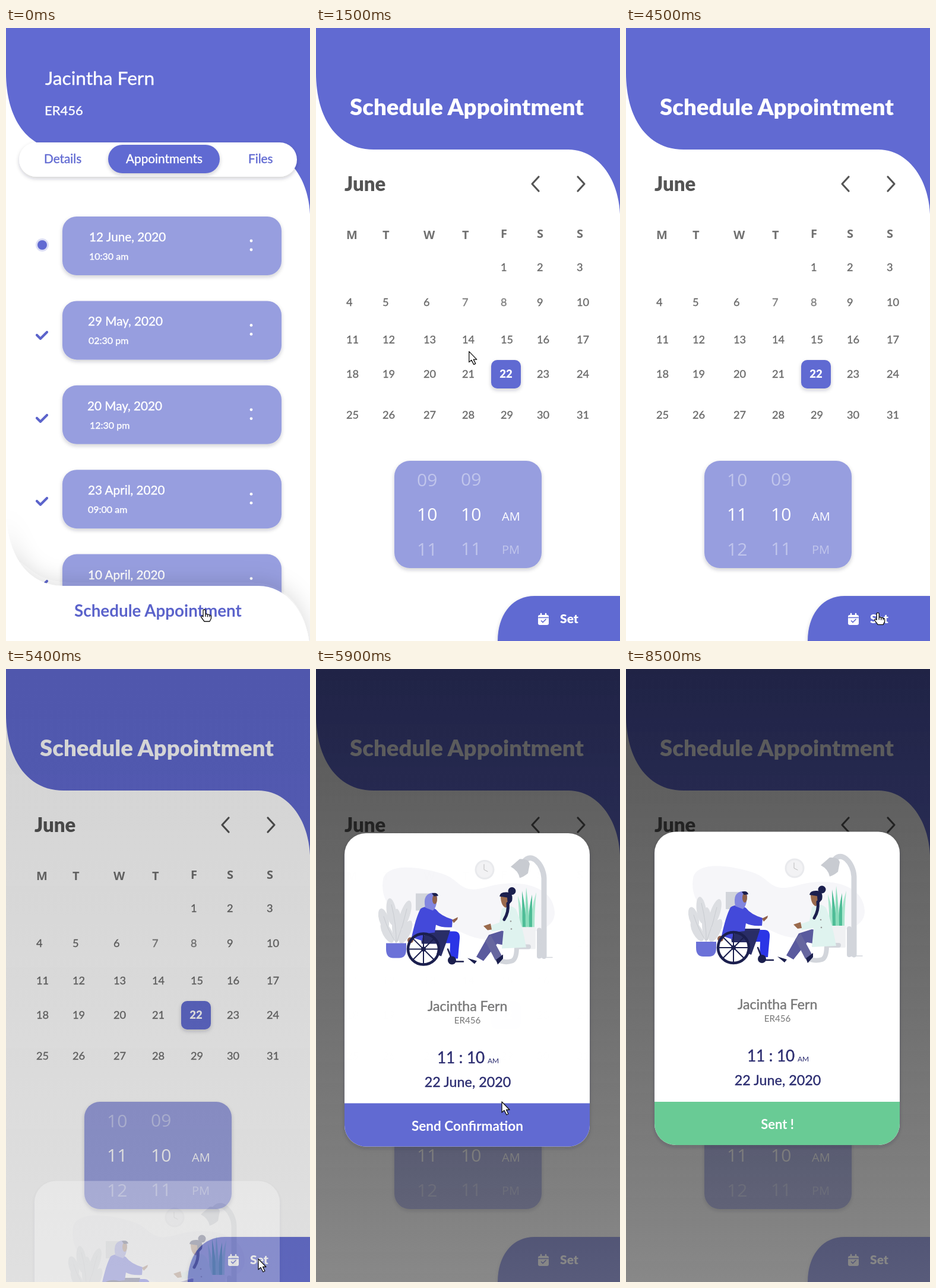
Write an HTML page that moves like this. It is 512 by 1034 pixels and loops after 8.6 s.

```html
<!DOCTYPE html>
<html lang="en">
<head>
<meta charset="utf-8">
<title>Appointment scheduling</title>
<style>
html,body{margin:0;height:100%;overflow:hidden;background:#fff}
svg{display:block;width:100vw;height:100vh}
text{font-family:Lato,Inter,sans-serif;white-space:pre}
.sys{font-family:"Open Sans","Noto Sans",sans-serif}
</style>
</head>
<body>
<svg id="stage" viewBox="0 0 512 1034"></svg>
<script>
const BLUE = '#616ad2', CARD = '#979edf', NAVY = '#1b1f4e', GREY = '#d2d5db';
const PERSON = 'Jacintha Fern', ID = 'ER456';
const LOOP = 8600;

const text = (x, y, s, size, fill, more = '') =>
  `<text x="${x}" y="${y}" font-size="${size}" fill="${fill}" ${more}>${s}</text>`;
const rect = (x, y, w, h, r, fill, more = '') =>
  `<rect x="${x}" y="${y}" width="${w}" height="${h}" rx="${r}" fill="${fill}" ${more}/>`;
const path = (d, fill, more = '') => `<path d="${d}" fill="${fill}" ${more}/>`;
const line = (d, stroke, w, more = '') =>
  path(d, 'none', `stroke="${stroke}" stroke-width="${w}" stroke-linecap="round" stroke-linejoin="round" ${more}`);
const disc = (x, y, r, fill, more = '') => `<circle cx="${x}" cy="${y}" r="${r}" fill="${fill}" ${more}/>`;
const oval = (x, y, rx, ry, fill, turn = 0) =>
  `<ellipse cx="${x}" cy="${y}" rx="${rx}" ry="${ry}" fill="${fill}" transform="rotate(${turn} ${x} ${y})"/>`;
const MID = 'text-anchor="middle"', SOFT = 'filter="url(#soft)"';
const medium = c => `stroke="${c}" stroke-width=".4"`;

// Appointment list
const visits = [
  ['12 June, 2020', '10:30 am', 140, 140],
  ['29 May, 2020', '02:30 pm', 138, 139],
  ['20 May, 2020', '12:30 pm', 137, 141],
  ['23 April, 2020', '09:00 am', 138, 138],
  ['10 April, 2020', '04:00 pm', 138, 138]
];
const visit = ([day, hour, dx, hx], i) => {
  const y = 318 + i * 142.4;
  return rect(95, y, 369, 99, 24, CARD, SOFT) +
    text(dx, y + 42, day, 20.7, '#fff', medium('#fff')) +
    text(hx, y + 73, hour, 16, '#fff', medium('#fff')) +
    disc(413, y + 41, 2.4, '#fff') + disc(413, y + 56, 2.4, '#fff') +
    (i ? line(`M52 ${378 + i * 140}l6 6 11-11`, '#5b63cb', 4.2)
       : disc(61, 366, 11, BLUE, 'opacity=".22"') + disc(61, 366, 8, BLUE));
};

// Calendar
const cols = [51, 112, 181, 246, 311, 372, 439], rows = [410, 469, 532, 590, 659];
const calendar = () => {
  let s = text(48, 275, 'June', 33, '#555', 'font-weight="900"') +
    line('M375 251l-11 12 11 12M441 251l11 12-11 12', '#555', 3.2);
  [...'MTWTFSS'].forEach((d, i) =>
    s += text(cols[i], i < 4 ? 356 : 354, d, 20, '#707070', 'class="sys" font-weight="700"'));
  s += rect(295, 560, 50, 48, 10, BLUE, SOFT);
  for (let d = 1; d < 32; d++) {
    const c = (d + 3) % 7, y = rows[(d + 3) / 7 | 0];
    s += d === 22 ? text(320, 590, d, 18.5, '#fff', MID + ' font-weight="900"')
      : text(cols[c], y, d, 18.2, d === 7 || d === 8 ? '#888' : '#666', medium('#777'));
  }
  return s;
};
const sys = (x, y, s, size, more = '') => text(x, y, s, size, '#fff', 'class="sys" ' + more);
const picker = () => rect(132, 730, 248, 181, 26, CARD, SOFT) +
  '<g clip-path="url(#wheel)">' +
  ['09', '10', '11', '12'].map(h => sys(170, 0, h, 30, 'data-hour')).join('') + '</g>' +
  sys(244, 772, '09', 30, 'opacity=".4"') + sys(244, 831, '10', 30) + sys(244, 889, '11', 30, 'opacity=".4"') +
  sys(313, 831, 'AM', 20) + sys(313, 887, 'PM', 20, 'opacity=".4"');
const setButton = path('M306 1034C306 990 330 958 368 958H512V1034Z', BLUE, SOFT) +
  rect(374, 990, 18, 17, 3, '#fff') + line('M379 988v4M387 988v4', '#fff', 2.5) +
  line('M375 994.5h16M379.5 1000l2.5 2.5 5-5', BLUE, 1.7) +
  text(411, 1004, 'Set', 21, '#fff', 'font-weight="900"');

// Consultation picture
const scene = () => {
  const leaf = (x, y, len, turn) => oval(x, y, 8, len, '#dcdee2', turn);
  const blade = (x, tip, top, c) =>
    path(`M${x - 3} 433Q${x - 4} 405 ${tip} ${top}Q${x + 3} 405 ${x + 3} 433Z`, c);
  const spokes = [0, 1, 2, 3].map(i => {
    const a = i * Math.PI / 4, x = 25 * Math.cos(a), y = 25 * Math.sin(a);
    return `M${181 - x} ${470 - y}L${181 + x} ${470 + y}`;
  }).join('');
  return path('M113 352C120 325 170 330 210 342C245 352 240 378 285 366C335 350 400 360 402 408C402 445 350 440 310 452C270 460 245 440 215 428C150 435 105 400 113 352Z', '#f6f6f9') +
    rect(168, 376, 29, 29, 0, GREY) +
    disc(284, 336, 16.5, '#e9eaed') + disc(284, 336, 13.5, '#f2f2f4') + line('M283 327v9l6 3', '#bbb', 1) +
    line('M384 482V350C383 326 362 306 351 322', GREY, 9) + line('M376 484h22', GREY, 1.5) +
    path('M328 331L343 318Q358 317 360 326L357 342Q350 348 343 350Q341 338 328 331Z', '#c8cbd1') +
    // left plant
    leaf(114, 419, 18, -16) + leaf(127, 407, 23, -8) + leaf(150, 412, 25, 18) +
    leaf(120, 442, 19, -28) + leaf(151, 441, 21, 25) + leaf(136, 430, 28, 0) +
    line('M135 460Q136 430 127 395M136 458Q147 430 153 402M134 458Q121 438 114 415', '#c9ccd1', 1) +
    path('M118 460H152V470Q152 485 140 485H130Q118 485 118 470Z', '#6b71d8') +
    // desk plant
    blade(346, 340, 380, '#a9e6cd') + blade(365, 371, 374, '#a9e6cd') + blade(351, 347, 372, '#4ebd97') +
    blade(361, 364, 378, '#4ebd97') + blade(356, 354, 366, '#8bdcbb') +
    rect(341, 433, 29, 37, 2, '#f0f1f3') +
    line('M306 488Q318 494 330 490Q338 487 338 466H358M376 438V482', GREY, 8) +
    // patient
    path('M179 440H233Q243 440 242 452L239 486H225L226 460H180Z', '#2b35e6') +
    path('M175 438H226L219 460L211 482L203 479L208 461H178Z', '#292d66') +
    path('M176 402Q188 394 202 403Q210 414 230 420L229 433Q211 434 202 429L200 442Q178 443 179 456L161 450Q168 417 176 402Z', '#4349da') +
    path('M184 400Q179 376 197 375Q207 377 203 390Q203 399 197 405Z', '#8286df') +
    oval(200, 386, 4, 8, '#8f604a') + path('M195 376Q204 373 206 380L199 381Z', NAVY) +
    path('M229 421L239 416L238 420L232 426Z', '#8f604a') + oval(159, 455, 5, 5, '#8f604a') +
    disc(181, 470, 26, 'none', `stroke="${NAVY}" stroke-width="4.5"`) +
    line(spokes, NAVY, 2) + disc(181, 470, 4, NAVY) +
    line('M222 470L229 488M232 491H248', NAVY, 2.5) + disc(229, 489, 7, NAVY) +
    // doctor
    path('M313 439L337 444L330 466L305 461L282 490L270 483L291 446Z', '#5a5a9e') +
    path('M294 446L314 483L302 489L285 456Z', '#66669f') +
    path('M255 485L271 490L267 495ZM303 488L315 479L315 486L306 496Z', NAVY) +
    path('M313 402Q328 393 337 403Q348 431 354 467L313 469L316 437L296 440L292 431L309 425Z', '#dff3ef') +
    path('M282 431L294 427L296 437L289 438Z', '#9a6a4c') + path('M311 380H326V398L319 400Q311 396 311 380Z', '#9a6a4c') +
    path('M309 381Q310 373 322 374Q333 375 330 389L323 397L322 383Z', NAVY) +
    disc(330, 372, 6.5, NAVY) + line('M323 393Q325 407 317 420', NAVY, 5) +
    disc(328, 423, 1.3, '#999') + disc(329, 436, 1.3, '#999');
};
const modal = () => rect(48, 274.5, 413, 528.5, 36, '#fff', SOFT) + scene() +
  text(255, 574, PERSON, 23.2, '#777', MID + ' ' + medium('#777')) + text(255, 595, ID, 15.2, '#777', MID) +
  text(244, 662, '11 : 10', 26, '#2b2c70', MID + ' ' + medium('#2b2c70')) + text(289, 662, 'AM', 12, '#2b2c70') +
  text(255.5, 702, '22 June, 2020', 23.3, '#2b2c70', MID + ' ' + medium('#2b2c70')) +
  '<path id="action" d="M48 730H461V767A36 36 0 0 1 425 803H84A36 36 0 0 1 48 767Z"/>' +
  text(255, 776, 'Send Confirmation', 22.6, '#fff', MID + ' font-weight="700" id="send"') +
  text(255, 776, 'Sent !', 22, '#fff', MID + ' font-weight="700" id="sent"');

const $ = id => document.getElementById(id);
$('stage').innerHTML = `<defs>
  <filter id="soft" x="-20%" y="-30%" width="140%" height="160%">
    <feDropShadow dx="0" dy="3" stdDeviation="3" flood-color="#223" flood-opacity=".22"/></filter>
  <filter id="glow" x="-20%" y="-50%" width="140%" height="200%">
    <feDropShadow dx="0" dy="-6" stdDeviation="18" flood-color="#223" flood-opacity=".14"/></filter>
  <clipPath id="wheel">${rect(132, 730, 248, 181, 26, '#000')}</clipPath>
  <linearGradient id="shade" x2="0" y2="1">
    <stop stop-opacity=".67"/>
    <stop offset=".3" stop-color="#060606" stop-opacity=".62"/>
    <stop offset="1" stop-color="#555" stop-opacity=".7"/>
  </linearGradient></defs>` +
  rect(0, 0, 512, 1034, 0, '#fff') +
  path('M0 0H512V314C509 250 472 205 425 205H97C37 205 0 154 0 75Z', BLUE) +
  `<g id="list">${visits.map(visit).join('')}` +
  path('M0 811C0 890 37 941 97 941H425C472 941 509 986 512 1050V1080H0Z', '#fff', 'filter="url(#glow)"') +
  `<g id="top">${text(66, 96, PERSON, 31.7, '#fff', medium('#fff'))}${text(65, 147, ID, 22, '#fff', medium('#fff'))}` +
  rect(22, 193, 468, 58, 29, '#fff', SOFT) + rect(172, 197, 188, 48, 24, BLUE, SOFT) +
  text(64, 228, 'Details', 20.8, BLUE, medium(BLUE)) +
  text(266.5, 228, 'Appointments', 20.8, '#fff', MID + ' ' + medium('#fff')) +
  text(408, 228, 'Files', 20.8, BLUE, medium(BLUE)) + '</g></g>' +
  text(0, 0, 'Schedule Appointment', 38, '#fff', MID + ' id="title"') +
  `<g id="plan">${calendar()}${picker()}${setButton}</g>` +
  rect(0, 0, 512, 1034, 0, 'url(#shade)', 'id="dim"') +
  `<g id="modal">${modal()}</g><g id="pointer" fill="#fff" stroke="#111" stroke-width="1.3" stroke-linejoin="round">
  <path id="arrow" d="M0 0V18L4 14.5 8 22 11 20.5 7.5 13.5H13Z"/>
  <path id="hand" d="M-2 1Q0-1 2 1V8Q4 6.500 5.500 8.500Q7.500 7.500 9 9.500Q11.500 9 11.500 12V15L9 20H0L-5.500 12.500Q-5.500 9.500-2 12ZM2 8v4M5.500 8.500v4M9 9.500v3"/></g>`;

const hours = [...document.querySelectorAll('[data-hour]')];
const unit = (t, start, length) => Math.min(1, Math.max(0, (t - start) / length));
const easeOut = (t, start, length) => 1 - (1 - unit(t, start, length)) ** 3;
const mix = (a, b, p) => a + (b - a) * p;
const rgb = (a, b, p) => `rgb(${a.map((v, i) => mix(v, b[i], p))})`;

// Pointer stops: time, x, y
const stops = [
  [0, 334, 981], [250, 334, 981], [700, 290, 389], [1200, 272, 430], [1850, 240, 690],
  [2350, 205, 823], [2550, 205, 823], [2780, 206, 783], [3500, 206, 783], [4250, 424, 986],
  [5200, 425, 988], [5400, 425, 995], [5600, 425, 995], [5900, 313, 730], [6300, 270, 765],
  [7100, 270, 765], [7900, 535, 960], [LOOP, 535, 960]
];
const within = (t, a, b) => t >= a && t < b;

function draw(t) {
  const p = easeOut(t, 490, 660), m = easeOut(t, 5338, 660), sent = unit(t, 6750, 300);
  $('list').setAttribute('opacity', 1 - p);
  $('top').setAttribute('transform', `translate(0 ${-237 * p})`);
  $('plan').setAttribute('opacity', p);

  const title = $('title');
  title.setAttribute('transform', `translate(${mix(256, 254, p)} ${mix(993, 147, p)})`);
  title.setAttribute('font-size', mix(27.8, 38.3, p));
  title.setAttribute('font-weight', p > .3 ? 900 : 700);
  title.setAttribute('fill', rgb([91, 99, 203], [255, 255, 255], Math.min(1, p / .6)));

  const hour = easeOut(t, 2550, 280);
  hours.forEach((el, i) => {
    const d = i - 1 - hour, a = Math.abs(d);
    el.setAttribute('y', 831 + d * 58.5);
    el.setAttribute('opacity', a <= 1 ? 1 - .6 * a : Math.max(0, .4 * (2 - a)));
  });

  $('dim').setAttribute('opacity', m);
  $('modal').setAttribute('opacity', m);
  $('modal').setAttribute('transform', `translate(0 ${796 * (1 - m)})`);
  $('action').setAttribute('fill', rgb([97, 106, 210], [105, 203, 149], sent));
  $('send').setAttribute('opacity', 1 - sent);
  $('sent').setAttribute('opacity', sent);

  const i = stops.findIndex(s => s[0] > t), a = stops[i - 1], b = stops[i];
  const u = unit(t, a[0], b[0] - a[0]), k = u * u * (3 - 2 * u);
  $('pointer').setAttribute('transform', `translate(${mix(a[1], b[1], k)} ${mix(a[2], b[2], k)})`);
  const hand = t < 350 || within(t, 4100, 5350) || within(t, 6050, 7250);
  $('hand').setAttribute('opacity', +hand);
  $('arrow').setAttribute('opacity', +!hand);
}

const begin = performance.now();
function tick() {
  draw((performance.now() - begin) % LOOP);
  requestAnimationFrame(tick);
}
tick();
</script>
</body>
</html>
```
